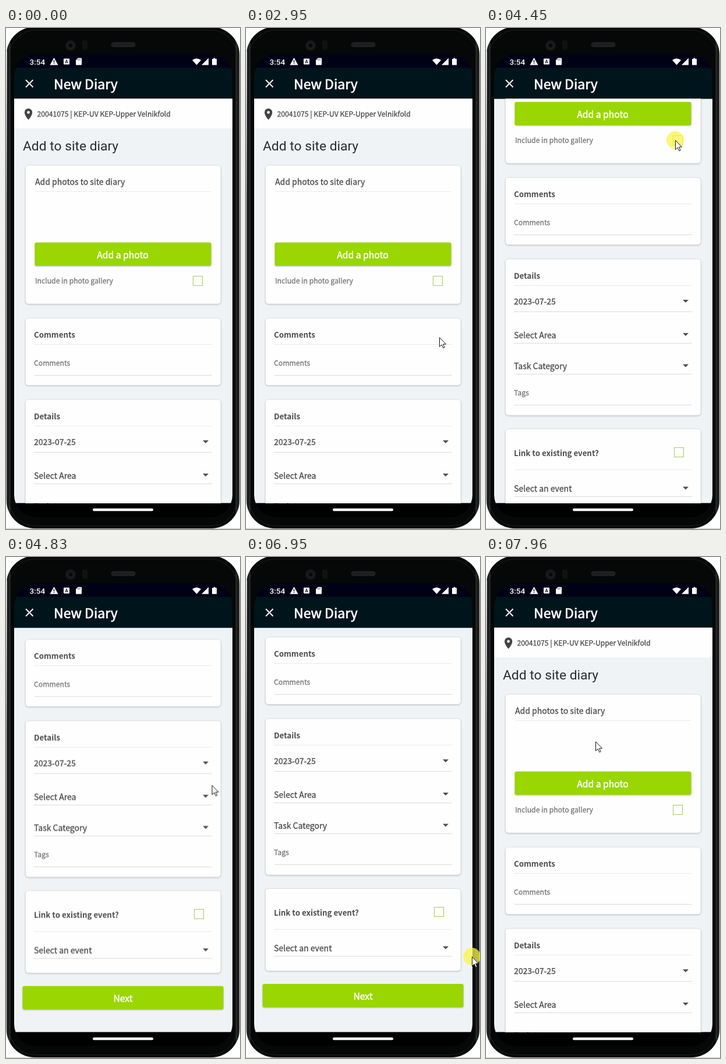
An HTML page for the animation above (8000 ms loop, 402 px wide and 859 px high).

```html
<!DOCTYPE html>
<html lang="en">
<head>
<meta charset="utf-8">
<title>New Diary</title>
<style>
html, body { margin: 0; width: 100%; height: 100%; overflow: hidden; background: #fff; }
svg { display: block; width: 100%; height: 100%; }
text { font-family: "Noto Sans CJK SC", "Noto Sans CJK JP", "Noto Sans CJK", "Noto Sans", sans-serif; }
/* a thin stroke gives the medium weight */
.field { font-size: 14px; fill: #4c4c4c; stroke: #4c4c4c; stroke-width: .3px; }
.hint { font-size: 12.2px; fill: #777; stroke: #777; stroke-width: .3px; }
.site { font-size: 12.2px; fill: #4c4c4c; stroke: #4c4c4c; stroke-width: .3px; }
.head { font-size: 13.3px; font-weight: 700; fill: #4c4c4c; }
.label { font-size: 15.7px; fill: #fff; stroke: #fff; stroke-width: .5px; text-anchor: middle; }
.bar-title { font-size: 23px; fill: #fff; stroke: #fff; stroke-width: .7px; }
.page-title { font: 400 22.8px Roboto, sans-serif; fill: #2b2d30; }
.clock { font: 500 13.5px Roboto, sans-serif; fill: #fff; }
.card { fill: #fefefe; stroke: #dfe2e4; filter: drop-shadow(0 1px 1px #0003); }
.btn { fill: #99d602; filter: drop-shadow(0 1px 1px #0004); }
.rule { stroke: #e9e9e9; }
.under { stroke: #dcdcdc; }
.box { fill: none; stroke: #a9c85a; }

.scroll { animation: scroll 8s linear infinite; }
.cursor { animation: move 8s linear infinite; }
.press { animation: press 8s step-end infinite; }

@keyframes scroll {
  0%, 50.5% { transform: translateY(0); animation-timing-function: ease-out; }
  55.625%, 56.5% { transform: translateY(-241px); animation-timing-function: ease-out; }
  61%, 87.875% { transform: translateY(-360px); animation-timing-function: ease-out; }
  93%, 100% { transform: translateY(0); }
}
@keyframes move {
  0%, 6.125% { transform: translate(345px, 870px); animation-timing-function: ease-out; }
  15.125%, 19% { transform: translate(229px, 342px); animation-timing-function: ease-in-out; }
  25%, 27% { transform: translate(251px, 317px); animation-timing-function: ease-in-out; }
  32.75%, 34.75% { transform: translate(275px, 340px); }
  36.875%, 37.75% { transform: translate(332px, 530px); animation-timing-function: ease-out; }
  41%, 44.625% { transform: translate(384px, 557px); }
  49.625%, 50.5% { transform: translate(362px, 352px); }
  55.625%, 56.5% { transform: translate(325px, 192px); animation-timing-function: ease-in-out; }
  63.5%, 73% { transform: translate(373px, 526.5px); animation-timing-function: ease-in-out; }
  77%, 78% { transform: translate(374px, 397px); }
  81.875%, 83% { transform: translate(381px, 550px); }
  86.875%, 87.875% { transform: translate(388px, 685px); }
  93%, 95.875% { transform: translate(361px, 840px); animation-timing-function: ease-out; }
  99.5%, 100% { transform: translate(188px, 316px); }
}
@keyframes press {
  0% { opacity: 0; }
  42% { opacity: .75; }
  58% { opacity: 0; }
  63.5% { opacity: .75; }
  70% { opacity: 0; }
  77% { opacity: .75; }
  92% { opacity: 0; }
}
</style>
</head>
<body>
<svg viewBox="0 0 402 859">
  <defs>
    <linearGradient id="rim">
      <stop offset="0" stop-color="#777"/>
      <stop offset=".006" stop-color="#0b0c0d"/>
      <stop offset=".014" stop-color="#34373a"/>
      <stop offset=".02" stop-color="#060707"/>
      <stop offset=".98" stop-color="#060707"/>
      <stop offset=".986" stop-color="#303336"/>
      <stop offset=".994" stop-color="#0b0c0d"/>
      <stop offset="1" stop-color="#666"/>
    </linearGradient>
    <linearGradient id="glint" x2="0" y2="1">
      <stop offset="0" stop-color="#fff"/>
      <stop offset="1" stop-color="#fff" stop-opacity="0"/>
    </linearGradient>
    <clipPath id="screen"><rect x="14" y="45" width="375" height="794" rx="38"/></clipPath>
    <clipPath id="view"><rect x="14" y="121.500" width="375" height="693"/></clipPath>
    <path id="drop" d="M338 -2.500h10l-5 5z" fill="#505050"/>
  </defs>

  <!-- phone body -->
  <path d="M0 858.500H402" stroke="#c9c9c9"/>
  <rect x=".5" y="-2" width="401" height="860" rx="49" fill="url(#rim)"/>
  <rect x="5.500" y="3.500" width="391" height="850" rx="45" fill="none" stroke="#1d1f20"/>
  <rect y="40" width="1.500" height="260" fill="url(#glint)"/>
  <circle cx="111" cy="30" r="9" fill="#17181a"/>
  <circle cx="111" cy="30" r="4.500" fill="#08090b" stroke="#292b2e"/>
  <rect x="131" y="21" width="9" height="17" rx="4" fill="#101112"/>
  <rect x="181" y="25" width="41" height="7" rx="3.500" fill="#1d1e20" stroke="#292a2c"/>

  <g clip-path="url(#screen)">
    <rect x="14" y="45" width="375" height="794"/>
    <rect x="14" y="45" width="375" height="24" fill="#010116"/>
    <rect x="14" y="68" width="375" height="54" fill="#00141b"/>

    <!-- status bar -->
    <text class="clock" x="40.500" y="63">3:54</text>
    <g transform="translate(0 -.5)">
      <g fill="#fff">
        <path d="M82.500 51.500L89.500 64h-14z"/>
        <rect x="99" y="53" width="10" height="10" rx="1"/>
        <path d="M123.500 52H129q1 0 1 1v10q0 1-1 1h-8q-1 0-1-1v-7z"/>
        <path d="M320 55.500q7.500-5.500 15 0L327.500 64z"/>
        <path d="M348 52v12h-12z"/>
        <path d="M356.500 52h3v1.500h2.500V64h-8V53.500h2.500z"/>
      </g>
      <path d="M82.500 55.500v4M82.500 60.500v1.500" stroke="#010116" stroke-width="1.400"/>
      <path d="M101.800 61l2.200-6 2.200 6M102.500 59.500h3" fill="none" stroke="#010116"/>
      <path d="M123.500 54v2M125.500 54v2M127.500 54v2" stroke="#010116" stroke-width=".8"/>
    </g>

    <!-- app bar -->
    <path d="M34 89l12.500 12.500M46.500 89L34 101.500" stroke="#fff" stroke-width="1.900"/>
    <text class="bar-title" x="82" y="105">New Diary</text>

    <g clip-path="url(#view)">
      <rect x="14" y="121" width="375" height="694" fill="#eff3f6"/>
      <g class="scroll">
        <rect x="14" y="121" width="375" height="51" fill="#fefefe"/>
        <path d="M38.500 138a6.700 6.700 0 0 1 6.700 6.700q0 5-6.700 12.800-6.700-7.800-6.700-12.800a6.700 6.700 0 0 1 6.700-6.700z" fill="#444"/>
        <circle cx="38.500" cy="144.700" r="2.400" fill="#fff"/>
        <text class="site" x="53.500" y="151.500">20041075 | KEP-UV KEP-Upper Velnikfold</text>
        <text class="page-title" x="29" y="210">Add to site diary</text>

        <rect class="card" x="33.500" y="235.500" width="335.500" height="237.500" rx="5"/>
        <text class="field" x="50" y="269">Add photos to site diary</text>
        <path class="rule" d="M50 280.500H352"/>
        <rect class="btn" x="49.500" y="367.700" width="303" height="40" rx="3"/>
        <text class="label" x="200.500" y="394.500">Add a photo</text>
        <text class="hint" x="50" y="438">Include in photo gallery</text>
        <rect class="box" x="321.500" y="425.500" width="16" height="16"/>

        <rect class="card" x="33.500" y="497.500" width="335.500" height="115" rx="5"/>
        <text class="head" x="48" y="531">Comments</text>
        <path class="rule" d="M48 542.500H354"/>
        <text class="hint" x="48" y="579">Comments</text>
        <path class="under" d="M48 595.500H354"/>

        <rect class="card" x="33.500" y="637" width="335.500" height="268" rx="5"/>
        <text class="head" x="48" y="670.500">Details</text>
        <path class="rule" d="M48 682.500H354"/>
        <text class="field" x="48" y="715">2023-07-25</text>
        <use href="#drop" y="709.500"/>
        <path class="under" d="M48 727.500H354"/>
        <text class="field" x="48" y="772.500">Select Area</text>
        <use href="#drop" y="766.500"/>
        <path class="under" d="M48 781.500H354"/>
        <text class="field" x="48" y="826">Task Category</text>
        <use href="#drop" y="820"/>
        <path class="under" d="M48 834.500H354"/>
        <text class="hint" x="48" y="870.500">Tags</text>
        <path class="under" d="M48 887.500H354"/>

        <rect class="card" x="33.500" y="928.500" width="335.500" height="141" rx="5"/>
        <text class="head" x="48" y="975">Link to existing event?</text>
        <rect class="box" x="323.500" y="960.500" width="16" height="16"/>
        <path class="rule" d="M48 998.500H354"/>
        <text class="field" x="48" y="1036">Select an event</text>
        <use href="#drop" y="1030"/>
        <path class="under" d="M48 1044.500H354"/>

        <rect class="btn" x="28.500" y="1092" width="345" height="40" rx="3"/>
        <text class="label" x="201" y="1118.500">Next</text>
      </g>
    </g>
    <rect x="149" y="823.700" width="104" height="4.600" rx="2.300" fill="#fff"/>
  </g>

  <g class="cursor">
    <circle class="press" r="15" fill="#fcf54a"/>
    <path d="M.5 .7V16.500L4.200 13l2.600 5.700 2.300-1-2.500-5.600H11.500z" fill="#fff" stroke="#111"/>
  </g>
</svg>
</body>
</html>
```
